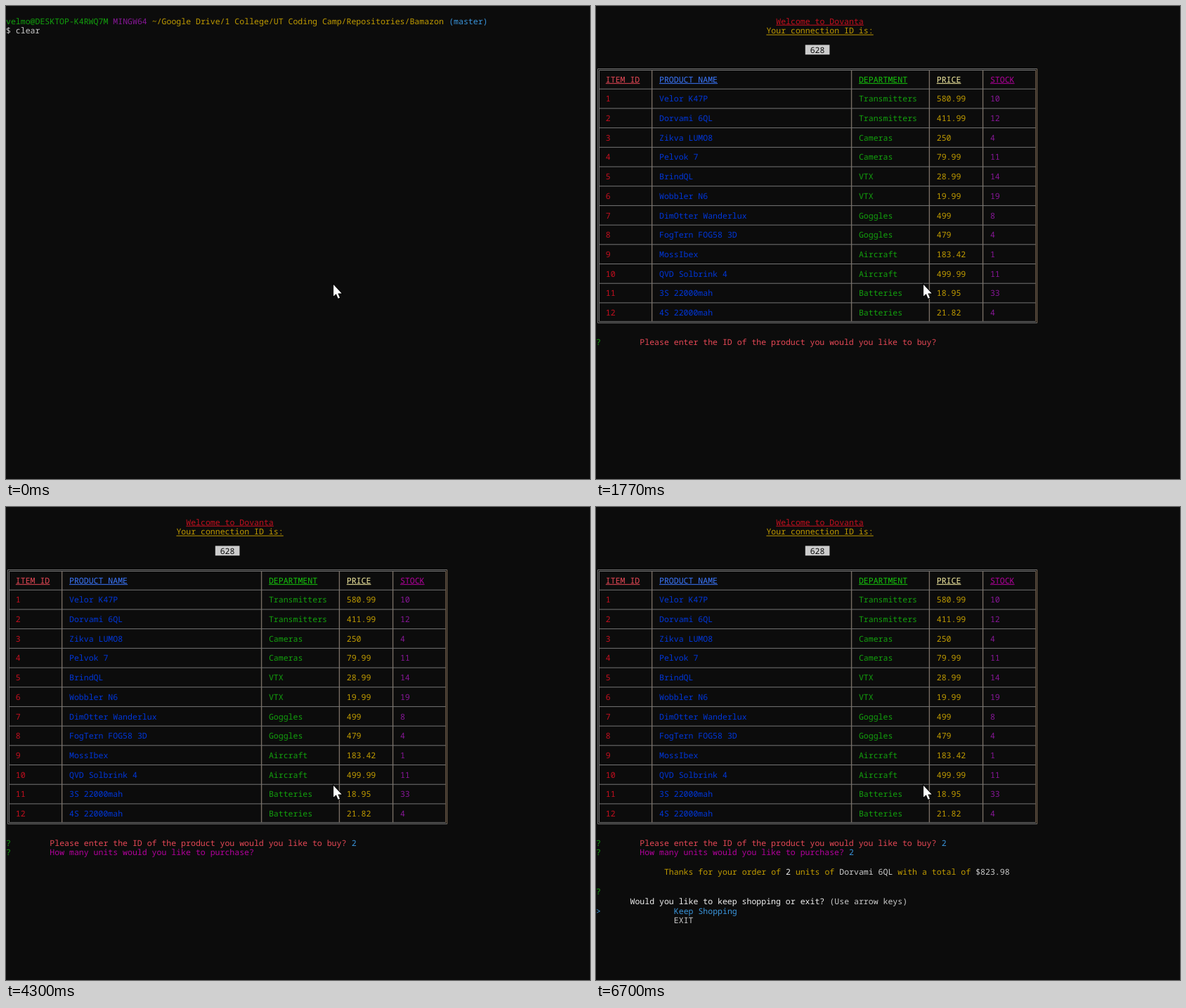
Write an HTML page that moves like this. It is 831 px wide and 674 px high and loops after 8000 ms.

```html
<!DOCTYPE html>
<html lang="en">
<head>
<meta charset="utf-8">
<title>Terminal shop</title>
<style>
html, body { margin: 0; width: 100%; height: 100%; overflow: hidden; background: #0c0c0c; }
svg { display: block; width: 831px; height: 674px; }
text {
  font: 11.54px "Noto Sans Mono", "DejaVu Sans Mono", monospace;
  text-rendering: geometricPrecision;
  font-variant-ligatures: none;
  white-space: pre;
}
</style>
</head>
<body>
<svg id="stage" viewBox="0 0 831 674"></svg>
<script>
const LOOP = 8000;
// A character cell is 7 by 14 dots; row 0 is the second line of the screen.
const DOT = 831 / 840, CELL_W = 7 * DOT, CELL_H = 14 * DOT, BASE = 25.55;
const C = {
  red: '#c50f1f', redHi: '#e74856', green: '#13a10e', greenHi: '#16c60c',
  blue: '#0037da', blueHi: '#3b78ff', purple: '#881798', purpleHi: '#b4009e',
  yellow: '#c19c00', yellowHi: '#f9f1a5', cyan: '#3a96dd',
  white: '#cccccc', whiteHi: '#f2f2f2', black: '#0c0c0c',
  rule: '#767676', post: '#766c62', edge: '#806c56'
};
const stage = document.getElementById('stage');
const layers = [];

function add(parent, tag, attrs) {
  const el = document.createElementNS('http://www.w3.org/2000/svg', tag);
  for (const key in attrs) el.setAttribute(key, attrs[key]);
  parent.appendChild(el);
  return el;
}

// A group visible from one time up to another.
function layer(from, to = LOOP) {
  const g = add(stage, 'g', {});
  layers.push({ g, from, to });
  return g;
}

function bar(parent, x, y, width, height, fill) {
  add(parent, 'rect', { x, y, width, height, fill });
}

const cellTop = row => (row + 1) * CELL_H;

// Text on the character grid.
function put(parent, row, col, str, fill, underline) {
  const x = col * CELL_W;
  add(parent, 'text', { x, y: Math.round(BASE + row * CELL_H), fill }).textContent = str;
  if (underline) bar(parent, x, cellTop(row) + 13 * DOT, str.length * CELL_W, DOT, fill);
}

function drawPrompt(g) {
  put(g, 0, 0, 'velmo@DESKTOP-K4RWQ7M', C.green);
  put(g, 0, 22, 'MINGW64', C.purple);
  put(g, 0, 30, '~/Google Drive/1 College/UT Coding Camp/Repositories/Bamazon', C.yellow);
  put(g, 0, 91, '(master)', C.cyan);
  put(g, 1, 0, '$', C.white);
}

// Box-drawing lines run through the middle of their cells.
function drawGrid(g) {
  const midX = col => (col + .5) * CELL_W;
  const midY = row => cellTop(row) + 7.5 * DOT;
  const across = (y, x1, x2) => bar(g, x1, y - DOT / 2, x2 - x1, DOT, C.rule);
  const down = (x, y1, y2, fill, w = DOT) => bar(g, x - w / 2, y1, w, y2 - y1, fill);
  const left = midX(0), right = midX(90), top = midY(5), bottom = midY(31);

  for (const col of [11, 52, 68, 79]) down(midX(col), top + DOT, bottom - DOT, C.post, 1.4);
  for (let row = 7; row < 31; row += 2) across(midY(row), left + DOT, right - DOT);
  for (const d of [-DOT, DOT]) {
    across(top + d, left + d, right - d);
    across(bottom - d, left + d, right - d);
    down(left + d, top + d, bottom - d, C.rule);
    down(right - d, top + d, bottom - d, C.edge);
  }
}

function drawShop(g) {
  put(g, 0, 37, 'Welcome to Dovanta', C.red, true);
  put(g, 1, 35, 'Your connection ID is:', C.yellow, true);
  bar(g, 43 * CELL_W, cellTop(3), 5 * CELL_W, CELL_H, C.white);
  put(g, 3, 44, '628', C.black);
  drawGrid(g);

  const cols = [2, 13, 54, 70, 81];
  const headInk = [C.redHi, C.blueHi, C.greenHi, C.yellowHi, C.purpleHi];
  const ink = [C.red, C.blue, C.green, C.yellow, C.purple];
  ['ITEM ID', 'PRODUCT NAME', 'DEPARTMENT', 'PRICE', 'STOCK']
    .forEach((s, i) => put(g, 6, cols[i], s, headInk[i], true));
  [
    'Velor K47P|Transmitters|580.99|10',
    'Dorvami 6QL|Transmitters|411.99|12',
    'Zikva LUMO8|Cameras|250|4',
    'Pelvok 7|Cameras|79.99|11',
    'BrindQL|VTX|28.99|14',
    'Wobbler N6|VTX|19.99|19',
    'DimOtter Wanderlux|Goggles|499|8',
    'FogTern FOG58 3D|Goggles|479|4',
    'MossIbex|Aircraft|183.42|1',
    'QVD Solbrink 4|Aircraft|499.99|11',
    '3S 22000mah|Batteries|18.95|33',
    '4S 22000mah|Batteries|21.82|4'
  ].forEach((line, n) => {
    [String(n + 1), ...line.split('|')].forEach((s, i) => put(g, 8 + 2 * n, cols[i], s, ink[i]));
  });

  put(g, 33, 0, '?', C.green);
  put(g, 33, 9, 'Please enter the ID of the product you would you like to buy?', C.redHi);
}

function drawUnits(g) {
  put(g, 34, 0, '?', C.green);
  put(g, 34, 9, 'How many units would you like to purchase?', C.purpleHi);
}

function drawReceipt(g) {
  put(g, 36, 14, 'Thanks for your order of', C.yellow);
  put(g, 36, 39, '2', C.whiteHi);
  put(g, 36, 41, 'units of', C.yellow);
  put(g, 36, 50, 'Dorvami 6QL', C.white);
  put(g, 36, 62, 'with a total of', C.yellow);
  put(g, 36, 78, '$823.98', C.white);
  put(g, 38, 0, '?', C.green);
  put(g, 39, 7, 'Would you like to keep shopping or exit?', C.whiteHi);
  put(g, 39, 48, '(Use arrow keys)', C.white);
  put(g, 40, 0, '>', C.cyan);
  put(g, 40, 16, 'Keep Shopping', C.cyan);
  put(g, 41, 16, 'EXIT', C.white);
}

bar(stage, 0, 0, 831, 674, C.black);
drawPrompt(layer(0, 1770));
put(layer(0, 500), 1, 2, 'clear', C.white);
put(layer(500, 1770), 1, 2, 'node bamazonCustomer.js', C.white);
drawShop(layer(1770));
put(layer(3770, 4240), 33, 71, '2', C.whiteHi);
put(layer(4240), 33, 71, '2', C.cyan);
drawUnits(layer(4300));
put(layer(6040, 6700), 34, 52, '2', C.whiteHi);
put(layer(6700), 34, 52, '2', C.cyan);
drawReceipt(layer(6700));

// Mouse pointer
add(stage, 'path', {
  d: 'M466 397V413.6L469.8 410.2L472.6 416.8L475 415.8L472.3 409.4H477.6Z',
  fill: '#fff', stroke: '#000', 'stroke-width': 2, 'paint-order': 'stroke'
});

function render(t) {
  for (const { g, from, to } of layers) {
    g.setAttribute('visibility', t >= from && t < to ? 'visible' : 'hidden');
  }
}

const start = performance.now();
function tick() {
  render((performance.now() - start) % LOOP);
  requestAnimationFrame(tick);
}
tick();
</script>
</body>
</html>
```
